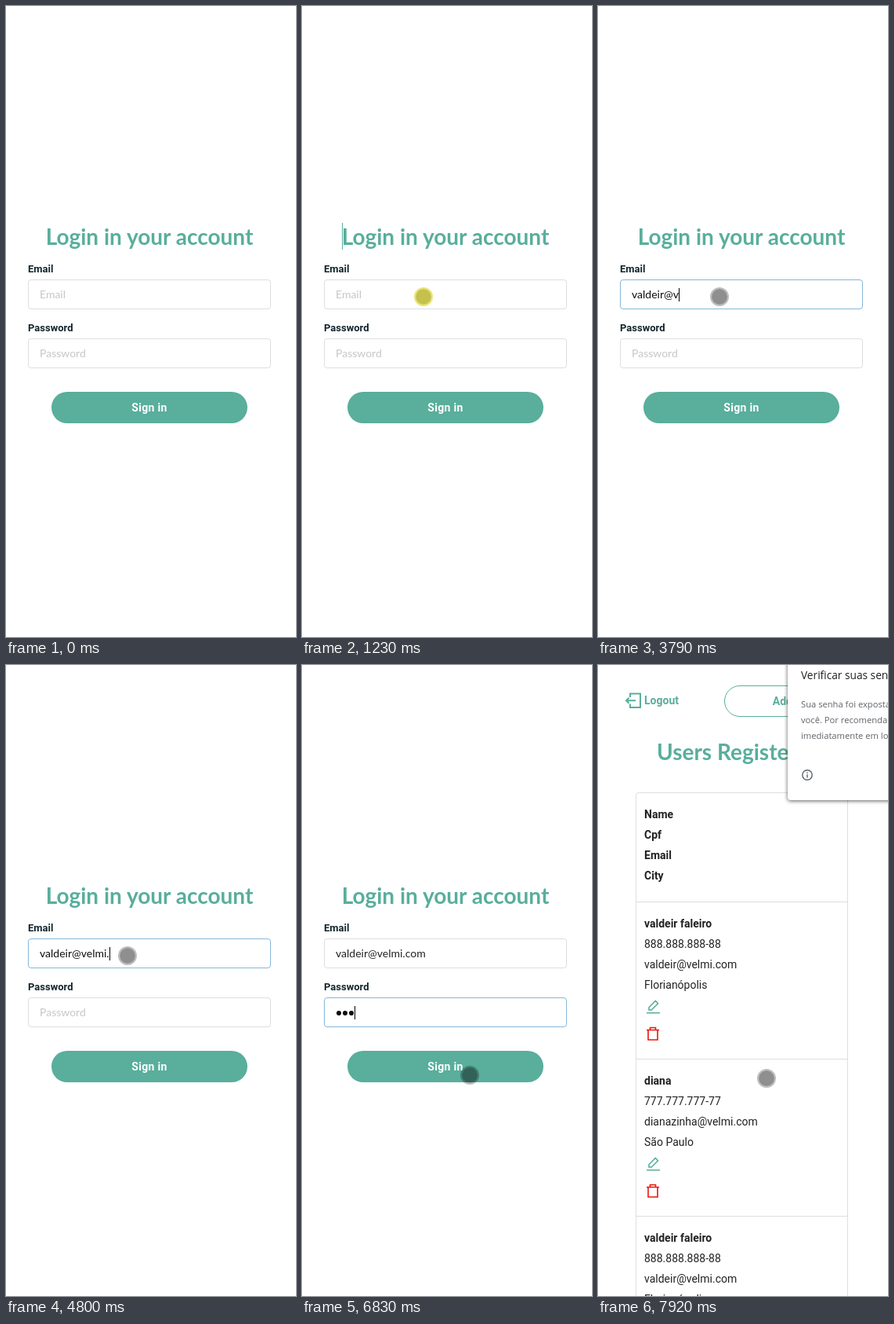
Recreate the animation shown at these times as an HTML page. Size 370 px wide and 803 px high, loop 8 s.

```html
<!DOCTYPE html>
<html lang="en">
<head>
<meta charset="utf-8">
<title>Sign in</title>
<style>
  :root { --green: #59ae9c; --line: rgba(34, 36, 38, .15); }
  * { box-sizing: border-box; }
  html, body { margin: 0; width: 100%; height: 100%; overflow: hidden; background: #fff; }
  #stage { position: relative; width: 370px; height: 803px; overflow: hidden; background: #fff; font: 14px/20px Roboto, sans-serif; color: rgba(0, 0, 0, .87); }
  #stage > *, .page > *, .popup > *, .row svg { position: absolute; white-space: nowrap; }
  .page { inset: 0; }
  b { font-weight: 700; }

  h1 { margin: 0; font: 700 28px/34px Lato, sans-serif; color: var(--green); }
  #login h1 { left: 0; width: 366px; top: 276px; text-align: center; }
  #login h1 span { position: relative; }
  .title-caret { position: absolute; left: 0; top: 0; width: 1px; height: 34px; background: var(--green); }
  label { left: 28px; font-size: 13px; font-weight: 700; color: #14272f; }
  .field { left: 28px; width: 310px; height: 38px; padding: 0 14px; border: 1px solid var(--line); border-radius: 4px; font: 14px/36px Lato, sans-serif; }
  .field.focus { border-color: #85b7d9; color: rgba(0, 0, 0, .95); }
  .hint { color: rgba(191, 191, 191, .87); }
  .focus .hint { color: rgba(115, 115, 115, .87); }
  .caret { display: inline-block; width: 1px; height: 17px; margin-right: -1px; vertical-align: -4px; background: #000; }
  .dot { display: inline-block; width: 6px; height: 6px; margin: 0 1px; border-radius: 50%; background: currentColor; vertical-align: 1px; }
  .button { width: 250px; height: 40px; left: 58px; top: 491px; border-radius: 20px; background: var(--green); color: #fff; font-weight: 700; line-height: 40px; letter-spacing: .3px; text-align: center; }

  #users { background: #fff; }
  .add { left: 161px; top: 26px; width: 180px; height: 40px; border: 1px solid var(--green); border-radius: 20px; color: var(--green); font-weight: 700; line-height: 38px; text-align: center; }
  .row { position: relative; width: 271px; height: 200px; padding: 14px 10px 0; border: solid var(--line); border-width: 0 1px 1px; line-height: 26px; }
  .row div { white-space: nowrap; }
  .head { left: 48px; top: 162px; height: 140px; border-top-width: 1px; border-radius: 4px 4px 0 0; font-weight: 700; }
  #users > .head { position: absolute; }
  #rows { left: 48px; top: 302px; }
  svg { fill: none; overflow: visible; }
  .edit, .logout { stroke: var(--green); stroke-width: 1.6; }
  .bin { stroke: #e8160c; stroke-width: 1.6; }

  .popup { left: 242px; top: -20px; width: 300px; height: 192px; border-radius: 4px; background: #fff; box-shadow: 0 1px 5px rgba(0, 0, 0, .65); font: 11.2px/20px "Open Sans", sans-serif; color: #5f6368; }
  .popup > * { left: 17px; }
  .popup .heading { top: 23px; font-size: 13.7px; color: #202124; }

  #cursor { left: 0; top: 0; width: 0; height: 0; animation: path 8s step-end -25ms infinite; }
  #cursor > * { position: absolute; left: -12px; top: -12px; width: 24px; height: 24px; }
  .ring { border-radius: 50%; border: 2px solid rgba(0, 0, 0, .26); background: rgba(0, 0, 0, .44) padding-box; animation: press 8s step-end -25ms infinite; }
  .move { animation: move 8s step-end -25ms infinite; }
  #users { animation: users 8s step-end -25ms infinite; }
  #rows { animation: rows 8s step-end -25ms infinite; }
  .popup { animation: popup 8s step-end -25ms infinite; }

  @keyframes path {
    0% { transform: translate(274px, 860px); }
    4.75% { transform: translate(274px, 748px); }
    5.75% { transform: translate(152px, 587px); }
    6.63% { transform: translate(112px, 465px); }
    7.63% { transform: translate(106px, 420px); }
    8.63% { transform: translate(105px, 404px); }
    9.5% { transform: translate(111px, 399px); }
    10.5% { transform: translate(122px, 394px); }
    11.5% { transform: translate(134px, 387px); }
    12.38% { transform: translate(145px, 379px); }
    13.38% { transform: translate(152px, 373px); }
    14.38% { transform: translate(155px, 370px); }
    72.63% { transform: translate(158px, 396px); }
    73.63% { transform: translate(165px, 435px); }
    74.63% { transform: translate(166px, 441px); }
    84.5% { transform: translate(196px, 497px); }
    85.38% { transform: translate(214px, 522px); }
    86.38%, 100% { transform: translate(215px, 526px); }
  }
  @keyframes press {
    0%, 17.25%, 47.38%, 77.5%, 90.13%, 100% { visibility: visible; }
    15.38%, 75.63%, 88.25% { background-color: rgba(172, 169, 0, .7); border-color: rgba(215, 205, 0, .55); }
    17.25%, 77.5%, 90.13% { background-color: rgba(0, 0, 0, .44); border-color: rgba(0, 0, 0, .26); }
    34.75% { visibility: hidden; }
  }
  @keyframes move {
    0%, 47.38%, 100% { visibility: hidden; }
    34.75% { visibility: visible; }
  }
  @keyframes users { 0% { visibility: hidden; } 91.13%, 100% { visibility: visible; } }
  @keyframes rows { 0% { visibility: hidden; } 98%, 100% { visibility: visible; } }
  @keyframes popup { 0% { visibility: hidden; } 99%, 100% { visibility: visible; } }
</style>
</head>
<body>
<div id="stage">
  <div class="page" id="login">
    <h1><span>Login in your account<i class="title-caret" id="titleCaret"></i></span></h1>
    <label style="top:325px">Email</label>
    <div class="field" id="email" style="top:348px"></div>
    <label style="top:400px">Password</label>
    <div class="field" id="password" style="top:423px"></div>
    <div class="button">Sign in</div>
  </div>

  <div class="page" id="users">
    <svg class="logout" style="left:35px;top:35px;stroke-width:2" width="20" height="20"><path d="M6 6V1.5H19V19H6V14.500M1 10.300H13M4.500 6.800 1 10.300 4.500 13.800"/></svg>
    <b style="left:59px;top:35px;color:var(--green)">Logout</b>
    <div class="add">Add user</div>
    <h1 style="left:75px;top:93px">Users Registered</h1>
    <div class="row head"><div>Name</div><div>Cpf</div><div>Email</div><div>City</div></div>
    <div id="rows"></div>
  </div>

  <div class="popup">
    <div class="heading">Verificar suas senhas</div>
    <div style="top:60px">Sua senha foi exposta</div>
    <div style="top:80px">você. Por recomendação</div>
    <div style="top:100px">imediatamente em local</div>
    <svg style="left:18px;top:153px" width="14" height="14" stroke="#5f6368" stroke-width="1.4"><circle cx="7" cy="7" r="6.200"/><path d="M7 6.300V10.500M7 3.600V5"/></svg>
  </div>

  <div id="cursor">
    <div class="ring"></div>
    <svg class="move" viewBox="-12 -12 24 24">
      <path d="M-5 0H5M0-5V5" stroke="#000" stroke-width="2"/>
      <path d="M0-7.500 3.500-4H-3.500ZM0 7.500 3.500 4H-3.500ZM-7.500 0-4-3.500V3.500ZM7.500 0 4-3.500V3.500Z" fill="#000"/>
    </svg>
  </div>
</div>

<script>
const LOOP = 8000, LEAD = 25, BLINK = 465;
const $ = id => document.getElementById(id);

const people = [
  ['valdeir faleiro', '888.888.888-88', 'valdeir@velmi.com', 'Florianópolis'],
  ['diana', '777.777.777-77', 'dianazinha@velmi.com', 'São Paulo'],
];
const icons = `
  <svg class="edit" style="left:12px;top:124px" width="18" height="18"><path d="M1 16.700H18M4 13V9.800L12.300 1.500 15.500 4.700 7.200 13Z"/></svg>
  <svg class="bin" style="left:12px;top:158px" width="18" height="18"><path d="M1 4.500H17M5.500 4.500V1.500H12.500V4.500M3 4.500V17H15V4.500"/></svg>`;
$('rows').innerHTML = [...people, people[0]].map(([name, ...rest]) =>
  `<div class="row"><div><b>${name}</b></div>${rest.map(s => `<div>${s}</div>`).join('')}${icons}</div>`).join('');

const fields = [
  { el: $('email'), hint: 'Email', glyphs: [...'valdeir@velmi.com'], focus: 1300, blur: 6130,
    keys: [1930, 2010, 2160, 2230, 2400, 2480, 2630, 3480, 3720, 4020, 4190, 4340, 4570, 4800, 4880, 5030, 5200] },
  { el: $('password'), hint: 'Password', glyphs: Array(3).fill('<i class="dot"></i>'), focus: 6130, blur: 7060,
    keys: [6360, 6510, 6680] },
];

function drawField(f, t) {
  const count = f.keys.filter(k => k <= t).length;
  const focused = t >= f.focus && t < f.blur;
  const lastKey = count ? f.keys[count - 1] : f.focus;
  const lit = focused && Math.floor((t - lastKey) / BLINK) % 2 === 0;
  const caret = lit ? '<i class="caret"></i>' : '';
  const html = count
    ? f.glyphs.slice(0, count).join('') + caret
    : `${caret}<span class="hint">${f.hint}</span>`;
  f.el.classList.toggle('focus', focused);
  if (f.html !== html) f.el.innerHTML = f.html = html;
}

let start;
function draw(now) {
  start ??= now;
  const t = (now - start + LEAD) % LOOP;
  fields.forEach(f => drawField(f, t));
  $('titleCaret').hidden = t < 1230 || t >= 1300;
  $('titleCaret').style.display = $('titleCaret').hidden ? 'none' : 'block';
  requestAnimationFrame(draw);
}
requestAnimationFrame(draw);
</script>
</body>
</html>
```
